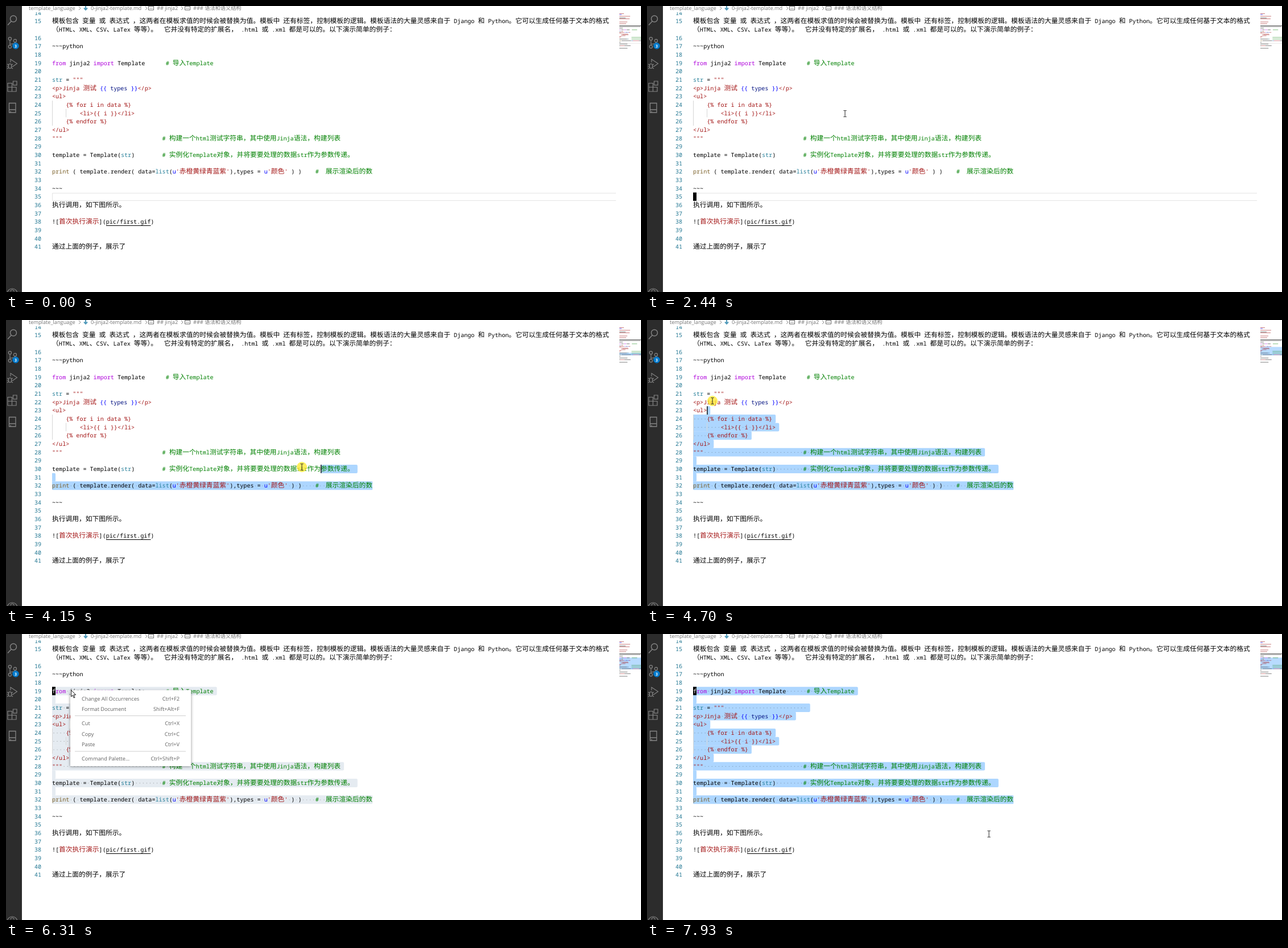
An HTML page with a canvas for the animation above (8 s loop, 1116x502 px).

```html
<!DOCTYPE html>
<html lang="zh-CN">
<head>
<meta charset="utf-8">
<title>Editor session</title>
<style>
html, body { margin: 0; width: 100%; height: 100%; overflow: hidden; background: #fff; }
canvas { display: block; width: 1116px; height: 502px; }
</style>
</head>
<body>
<canvas id="stage" width="1116" height="502"></canvas>
<script>
const ctx = document.getElementById('stage').getContext('2d');
const LOOP = 8000, LEFT = 81, ROW = 14.667, CHAR = 6.05, WIDE = 11.75;
const MONO = '10.08px "Noto Sans Mono", "DejaVu Sans Mono", monospace';
const CJK = WIDE + 'px "Noto Sans CJK SC", "Noto Sans CJK", sans-serif';
const UI = '9.2px "Open Sans", "Noto Sans CJK SC", sans-serif';
const INK = '#000', KEY = '#af00db', STR = '#a31515', NOTE = '#008000',
      TYPE = '#267f99', BLUE = '#0000ff', NAVY = '#001080', FUNC = '#795e26', SELECT = '#add6ff';
const sp = n => ' '.repeat(n);

// line number -> [text, colour] runs
const lines = {
  17: [['~~~python', INK]],
  19: [['from', KEY], [' jinja2 ', INK], ['import', KEY], [' Template' + sp(6), INK], ['# 导入Template', NOTE]],
  21: [['str', TYPE], [' = ', INK], ['"""' + sp(24), STR]],
  22: [['<p>Jinja 测试 ', STR], ['{{', BLUE], [' types ', NAVY], ['}}', BLUE], ['</p>', STR]],
  23: [['<ul>', STR]],
  24: [[sp(4) + '{% for i in data %}', STR]],
  25: [[sp(8) + '<li>{{ i }}</li>', STR]],
  26: [[sp(4) + '{% endfor %}', STR]],
  27: [['</ul>', STR]],
  28: [['"""' + sp(29), STR], ['# 构建一个html测试字符串，其中使用Jinja语法，构建列表', NOTE]],
  30: [['template = Template(', INK], ['str', TYPE], [')' + sp(8), INK],
       ['# 实例化Template对象，并将要要处理的数据str作为参数传递。', NOTE]],
  32: [['print', FUNC], [' ( template.render( data=', INK], ['list', TYPE], ['(', INK], ['u', BLUE],
       ["'赤橙黄绿青蓝紫'", STR], ['),types = ', INK], ['u', BLUE], ["'颜色'", STR],
       [' ) )' + sp(4), INK], ['#  展示渲染后的数', NOTE]],
  34: [['~~~', INK]],
  36: [['执行调用，如下图所示。', INK]],
  38: [['![', INK], ['首次执行演示', STR], ['](pic/first.gif)', INK]],
  41: [['通过上面的例子，展示了', INK]]
};
const intro = [
  '模板包含 变量 或 表达式 ，这两者在模板求值的时候会被替换为值。模板中 还有标签，控制模板的逻辑。模板语法的大量灵感来自于 Django 和 Python。它可以生成任何基于文本的格式',
  '（HTML、XML、CSV、LaTex 等等）。 它并没有特定的扩展名， .html 或 .xml 都是可以的。以下演示简单的例子：'
];

// time, x, y of the pointer
const path = [
  [70, 957, 478], [300, 690, 360], [600, 230, 200], [820, 78, 138], [900, 77, 137],
  [1360, 78, 98], [1700, 78, 98], [1740, 80, 98], [1905, 80, 98], [1915, 73, 91], [2060, 73, 91],
  [2330, 270, 165], [2590, 454, 222], [2820, 456, 223], [3205, 643, 275], [3285, 643, 275],
  [3590, 646, 288], [3740, 647, 289], [3910, 646, 290], [4150, 520, 258], [4400, 260, 205],
  [4560, 130, 172], [4640, 117, 159], [4695, 115, 142], [4760, 115, 142], [5000, 92, 118],
  [5290, 77, 100], [5440, 77, 100], [5750, 115, 99], [6010, 115, 99], [6150, 114, 98],
  [6400, 114, 98], [6850, 150, 176], [7630, 150, 177], [7780, 400, 270], [7930, 601, 351]
];
const menu = [
  [113.5, 'Change All Occurrences', 'Ctrl+F2'], [132, 'Format Document', 'Shift+Alt+F'],
  [157, 'Cut', 'Ctrl+X'], [175.5, 'Copy', 'Ctrl+C'], [194, 'Paste', 'Ctrl+V'],
  [218.5, 'Command Palette...', 'Ctrl+Shift+P']
];

const rowTop = n => 92.7 + (n - 19) * ROW;
const charWidth = c => c > '\u2e80' ? WIDE : CHAR;
const width = s => [...s].reduce((w, c) => w + charWidth(c), 0);
const lineText = n => (lines[n] || []).map(r => r[0]).join('');
const lineEnd = n => LEFT + width(lineText(n));
const within = (t, a, b) => t >= a && t < b;

function rect(x, y, w, h, color) {
  ctx.fillStyle = color;
  ctx.fillRect(x, y, w, h);
}

function disc(x, y, r, color) {
  ctx.fillStyle = color;
  ctx.beginPath();
  ctx.arc(x, y, r, 0, Math.PI * 2);
  ctx.fill();
}

function stroke(d, color, w = 1) {
  ctx.strokeStyle = color;
  ctx.lineWidth = w;
  ctx.stroke(new Path2D(d));
}

function mono(s, x, y, color) {
  ctx.fillStyle = color;
  for (const part of s.match(/[\u2e80-\uffff]+|[^\u2e80-\uffff]+/g) || []) {
    ctx.font = part[0] > '\u2e80' ? CJK : MONO;
    ctx.fillText(part, x, y);
    x += width(part);
  }
  return x;
}

function label(s, x, y, color, align = 'left') {
  ctx.font = UI;
  ctx.fillStyle = color;
  ctx.textAlign = align;
  ctx.fillText(s, x, y);
  ctx.textAlign = 'left';
}

function pointer(t) {
  const i = path.findIndex(p => p[0] > t);
  if (i < 0) return path[path.length - 1].slice(1);
  if (i === 0) return path[0].slice(1);
  const [t0, x0, y0] = path[i - 1], [t1, x1, y1] = path[i];
  const k = (t - t0) / (t1 - t0);
  return [x0 + (x1 - x0) * k, y0 + (y1 - y0) * k];
}

// Selection focus follows the pointer slightly late
function focusAt(t) {
  if (t < 3960) return null;
  if (t >= 5290) return { line: 19, x: LEFT };
  const [mx, my] = pointer(t - 60);
  const line = Math.max(19, Math.min(32, 19 + Math.floor((my - 92.7) / ROW)));
  let x = LEFT;
  for (const c of lineText(line)) {
    if (x + charWidth(c) / 2 > mx) break;
    x += charWidth(c);
  }
  return { line, x };
}

function drawSelection(focus, active) {
  for (let n = focus.line; n <= 32; n++) {
    const x0 = n === focus.line ? focus.x : LEFT;
    const x1 = lineEnd(n) + (n < 32 ? CHAR : 0);
    ctx.fillStyle = active ? SELECT : '#e5ebf1';
    ctx.beginPath();
    ctx.roundRect(x0, rowTop(n), Math.max(0, x1 - x0), ROW + .2, n < 32 ? [0, 2, 2, 0] : 1);
    ctx.fill();
    let x = LEFT;
    for (const c of lineText(n)) {
      if (c === ' ' && x >= x0 - .1) disc(x + 3, rowTop(n) + 7.7, .65, 'rgba(51,51,51,.35)');
      x += charWidth(c);
    }
  }
}

function drawCode() {
  for (let n = 14; n <= 41; n++) {
    // line 15 wraps, so the rows before it sit one higher
    const y = rowTop(n < 16 ? n - 1 : n) + 11;
    mono(String(n), 50, y, '#237893');
    let x = LEFT;
    for (const [s, color] of lines[n] || []) x = mono(s, x, y, color);
  }
  intro.forEach((s, i) => mono(s, LEFT, rowTop(14 + i) + 11, INK));
  rect(176, 385, 78.5, 1, INK);
}

function drawGuides() {
  rect(81, rowTop(24), 1, ROW * 3, '#d6d6d6');
  rect(105, rowTop(25), 1, ROW, '#d6d6d6');
}

function drawBreadcrumb() {
  const gray = '#747474';
  rect(28, 0, 1040, 11, '#fff');
  label('template_language', 40, 7, gray);
  label('0-jinja2-template.md', 149, 7, gray);
  label('## jinja2', 265, 7, gray);
  label('### 语法和语义结构', 329, 7, gray);
  for (const x of [128, 245, 308]) stroke(`M${x} 1l3 3l-3 3`, '#888');
  stroke('M140 0v6M137 3.5l3 3.2l3-3.2', '#519aba', 2);
  for (const x of [250.5, 314.5]) {
    stroke(`M${x} .5h9v6.5h-9zM${x + 2} 4h2M${x + 5} 4h2`, '#666');
  }
}

function drawSidebar() {
  const c = '#858585';
  rect(0, 0, 28, 502, '#2c2c2c');
  stroke('M18.5 22.5a5.5 5.5 0 1 1-11 0a5.5 5.5 0 1 1 11 0M9 27l-6 6.5', c, 1.4);
  stroke('M9.5 57.5a2.6 2.6 0 1 1-5.2 0a2.6 2.6 0 1 1 5.2 0M9.5 71.5a2.6 2.6 0 1 1-5.2 0a2.6 2.6 0 1 1 5.2 0M18.5 61a2.6 2.6 0 1 1-5.2 0a2.6 2.6 0 1 1 5.2 0M7 60v9M16 63.5q0 3-9 3.5', c, 1.2);
  disc(17, 70, 5.8, '#007acc');
  ctx.font = 'bold 7px "Open Sans", sans-serif';
  ctx.fillStyle = '#fff';
  ctx.fillText('3', 15, 72.6);
  stroke('M8 99v-5.5l11.5 7.5l-8 5.5M4.5 104a2.5 2.5 0 0 1 5 0v3a2.5 2.5 0 0 1-5 0zM2 102l2.5 1.5M12 102l-2.5 1.5M1.8 106h2.7M9.5 106h2.7M2 110l2.5-1.8M12 110l-2.5-1.8', c, 1.1);
  stroke('M3 135.5h7.5v7H18v7.5H3zM3 142.5h7.5v7.5M12.5 132h6.5v6.8h-6.5z', c, 1.2);
  stroke('M5.5 170.5h11.5v16.5H5.5zM5.5 182h11.5M8 184.5v2', c, 1.3);
  stroke('M20 505a9 9 0 0 0-18 0M14 501a3 3 0 0 0-6 0', c, 1.2);
}

function drawMinimap(focus) {
  const top = n => 41.4 + (n - 19) * 1.467;
  const x0 = 1078, scale = .11;
  if (focus) rect(x0, top(focus.line), 38, top(33) - top(focus.line), '#b8dbff');
  else rect(x0, top(35), 38, 1, '#e8e8e8');
  ctx.globalAlpha = .55;
  [[13, 8, STR], [14.5, 4, BLUE], [17.5, 19, STR], [20.5, 11, INK], [22, 18, STR], [27.5, 14, STR], [30.5, 12, STR]]
    .forEach(([y, w, color]) => rect(x0, y, w, 1, color));
  rect(x0, top(14), 38, 1, INK);
  rect(x0, top(15), 37, 1, INK);
  for (const n in lines) {
    let x = x0;
    for (const [s, color] of lines[n]) {
      const lead = width(s.match(/^ */)[0]) * scale;
      rect(x + lead, top(+n), width(s.trim()) * scale, .9, color);
      x += width(s) * scale;
    }
  }
  ctx.globalAlpha = 1;
}

function drawCaret(t, focus) {
  if (!focus) {
    if (t >= 2090 && (t - 2090) % 1000 < 500) rect(LEFT, rowTop(35), 6, ROW, INK);
  } else if (t < 5290) {
    rect(focus.x, rowTop(focus.line), 1.4, ROW, INK);
  } else {
    rect(LEFT, rowTop(19), 6, ROW, INK);
    mono('f', LEFT, rowTop(19) + 11, '#fff');
  }
}

function drawMenu(mx, my) {
  ctx.save();
  ctx.shadowColor = 'rgba(0,0,0,.45)';
  ctx.shadowBlur = 5;
  ctx.shadowOffsetY = 1;
  rect(113, 98.5, 212, 133.5, '#fff');
  ctx.restore();
  for (const [y, name, keys] of menu) {
    const hover = Math.abs(my - y) < 9.2 && mx > 113;
    if (hover) rect(113, y - 9.2, 212, 18.4, '#0060c0');
    const color = hover ? '#fff' : '#616161';
    label(name, 133, y + 3.3, color);
    label(keys, 305, y + 3.3, color, 'right');
  }
  for (const y of [143, 205.5]) rect(121, y, 195, 1, '#cfcfcf');
}

function drawPointer(t, x, y, menuOpen) {
  if (t < 70) return;
  const pressed = within(t, 3910, 5300) || within(t, 6010, 6150) || within(t, 6940, 7080);
  if (pressed) disc(x, y, 9, 'rgba(255,232,40,.75)');
  ctx.save();
  ctx.translate(Math.round(x), Math.round(y));
  if (x <= 80.5 || menuOpen) {
    const arrow = 'M.5 .5v11.5l2.7-2.5l2 4.6l1.8-.8l-2-4.5h3.7z';
    ctx.fillStyle = '#fff';
    ctx.fill(new Path2D(arrow));
    stroke(arrow, '#111');
  } else {
    stroke('M-2.5 -5.5h2l.5 .5l.5-.5h2M0 -5v10M-2.5 5.5h2l.5-.5l.5 .5h2', '#222');
  }
  ctx.restore();
}

function draw(t) {
  const [mx, my] = pointer(t);
  const focus = focusAt(t);
  const menuOpen = within(t, 6150, 7010);
  ctx.textRendering = 'geometricPrecision';
  rect(0, 0, 1116, 502, '#fff');
  if (focus) drawSelection(focus, !within(t, 6010, 7010));
  else stroke('M1072 328.5H81.5V341.5H1072', '#e4e4e4');
  drawGuides();
  drawCode();
  drawCaret(t, focus);
  drawBreadcrumb();
  drawSidebar();
  drawMinimap(focus);
  if (within(t, 820, 2060) || within(t, 5200, 5440)) stroke('M69.5 69.5l3.5 3.5l3.5-3.5', '#555');
  if (menuOpen) drawMenu(mx, my);
  drawPointer(t, mx, my, menuOpen);
}

let start;
function tick(now) {
  if (start === undefined) start = now;
  draw((now - start) % LOOP);
  requestAnimationFrame(tick);
}
requestAnimationFrame(tick);
</script>
</body>
</html>
```
